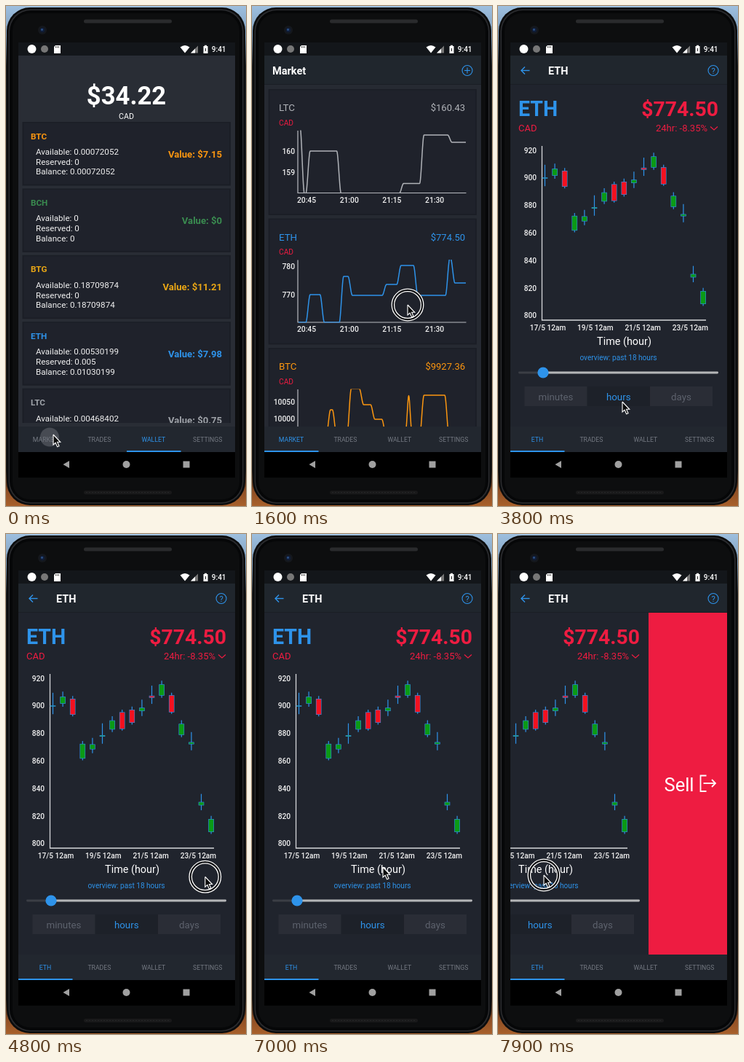
An HTML page with a canvas that plays this animation: 330x686 px, repeating every 8 s.

```html
<!DOCTYPE html>
<html lang="en">
<head>
<meta charset="utf-8">
<title>Crypto wallet demo</title>
<style>
html, body { margin: 0; width: 100%; height: 100%; overflow: hidden; background: #000; }
canvas { display: block; width: 330px; height: 686px; }
</style>
</head>
<body>
<canvas id="stage"></canvas>
<script>
const W = 330, H = 686, LOOP = 8000, TAU = Math.PI * 2;
const canvas = document.getElementById('stage');
const dpr = window.devicePixelRatio || 1;
canvas.width = W * dpr;
canvas.height = H * dpr;
const ctx = canvas.getContext('2d');

const BLUE = '#2e93ea', RED = '#ee1c41', ORANGE = '#fb9610', GREY = '#9fa3a9';
const PAGE = '#20242d', BAR = '#20262d', CARD = '#1f222b', GAP = '#262a32', LABEL = '#f1f1f1';

// ---------- helpers ----------
function text(str, x, y, size, color, align = 'left', weight = 400) {
  ctx.font = `${weight} ${size}px Roboto, sans-serif`;
  ctx.textAlign = align;
  ctx.fillStyle = color;
  ctx.fillText(str, x, y);
}

function rect(x, y, w, h, color) {
  ctx.fillStyle = color;
  ctx.fillRect(x, y, w, h);
}

function rounded(x, y, w, h, r, color) {
  ctx.beginPath();
  ctx.roundRect(x, y, w, h, r);
  ctx.fillStyle = color;
  ctx.fill();
}

function disc(x, y, r, color) {
  ctx.beginPath();
  ctx.arc(x, y, r, 0, TAU);
  ctx.fillStyle = color;
  ctx.fill();
}

function ring(x, y, r, color, width) {
  ctx.beginPath();
  ctx.arc(x, y, r, 0, TAU);
  ctx.strokeStyle = color;
  ctx.lineWidth = width;
  ctx.stroke();
}

function trace(points) {
  ctx.beginPath();
  for (let i = 0; i < points.length; i += 2) ctx.lineTo(points[i], points[i + 1]);
}

function lines(points, color, width) {
  trace(points);
  ctx.strokeStyle = color;
  ctx.lineWidth = width;
  ctx.stroke();
}

function shape(points, color) {
  trace(points);
  ctx.closePath();
  ctx.fillStyle = color;
  ctx.fill();
}

function plot(f, from, to, color, width) {
  ctx.beginPath();
  for (let x = from; x <= to; x += 0.5) ctx.lineTo(x, f(x));
  ctx.strokeStyle = color;
  ctx.lineWidth = width;
  ctx.lineJoin = 'round';
  ctx.stroke();
}

function clipped(x, y, w, h, draw) {
  ctx.save();
  ctx.beginPath();
  ctx.rect(x, y, w, h);
  ctx.clip();
  draw();
  ctx.restore();
}

const clamp = v => Math.max(0, Math.min(1, v));
const ease = v => v * v * (3 - 2 * v);
const progress = (t, from, to) => ease(clamp((t - from) / (to - from)));

// Eased interpolation between keys of the form [position, ...values].
function between(keys, at) {
  let i = 0;
  while (i < keys.length - 2 && keys[i + 1][0] <= at) i++;
  const a = keys[i], b = keys[i + 1], k = progress(at, a[0], b[0]);
  return a.slice(1).map((v, j) => v + (b[j + 1] - v) * k);
}

// ---------- phone ----------
function drawPhone() {
  const backdrop = ctx.createLinearGradient(0, 0, 0, H);
  backdrop.addColorStop(0, '#9dbfdf');
  backdrop.addColorStop(0.06, '#7f9dbb');
  backdrop.addColorStop(0.12, '#1b1d20');
  backdrop.addColorStop(0.93, '#161413');
  backdrop.addColorStop(0.97, '#8f4f25');
  backdrop.addColorStop(1, '#a8602b');
  rect(0, 0, W, H, backdrop);
  rounded(1, 2, 328, 683, 32, '#0b0c0d');
  rounded(3.5, 4.5, 323, 678, 30, '#2a2b2e');
  rounded(5, 6, 320, 675, 29, '#060708');
  rounded(9, 10, 312, 667, 24, '#0d0e0f');
  rounded(107, 18.5, 121, 5, 2.5, '#2a2b2d');
  rounded(107, 665, 121, 5, 2.5, '#19191a');
  for (let x = 110; x < 226; x += 4) rect(x, 667, 2, 1, '#262728');
  disc(50, 33, 6, '#15181d');
  disc(50, 33, 3.2, '#101d38');
  disc(49.5, 32.5, 1.4, '#2d5288');
}

function drawStatusBar() {
  rect(17, 50, 298, 18, '#13161a');
  disc(35.5, 59, 6, '#fff');
  disc(53, 59, 5, '#777');
  shape([68, 54, 75, 54, 75, 65, 66, 65, 66, 56], '#fff');
  for (const x of [68, 70, 72]) rect(x, 55.3, 1, 2, '#333');
  ctx.beginPath();
  ctx.moveTo(246, 64.5);
  ctx.lineTo(239.5, 56.5);
  ctx.quadraticCurveTo(246, 51.5, 252.5, 56.5);
  ctx.fillStyle = '#fff';
  ctx.fill();
  shape([264, 54.5, 264, 64.5, 254, 64.5], '#777');
  shape([260, 58.5, 260, 64.5, 254, 64.5], '#fff');
  rect(271.5, 55, 6, 10, '#fff');
  rect(273, 53.8, 3, 1.5, '#fff');
  rect(274, 58, 1, 4, '#222');
  text('9:41', 302.5, 63, 10, '#fff', 'right', 500);
}

function drawNavBar() {
  rect(17, 612, 298, 35, '#000');
  shape([78.5, 629, 87, 624, 87, 634], '#a0a0a0');
  disc(165.5, 629, 5, '#a0a0a0');
  rect(243.5, 624.5, 9, 9, '#a0a0a0');
}

function drawTabs(first, active) {
  rect(17, 577, 298, 35, '#22272f');
  [first, 'TRADES', 'WALLET', 'SETTINGS'].forEach((name, i) => {
    const color = Math.abs(active - i) < 0.5 ? BLUE : '#747982';
    text(name, 54 + i * 74.4, 597.5, 8.7, color, 'center');
  });
  rect(17 + active * 74.5, 610, 74.5, 2, BLUE);
}

// ---------- wallet ----------
const coins = [
  ['BTC', '0.00072052', '0', '0.00072052', '$7.15', ORANGE],
  ['BCH', '0', '0', '0', '$0', '#3a8c50'],
  ['BTG', '0.18709874', '0', '0.18709874', '$11.21', '#e9a615'],
  ['ETH', '0.00530199', '0.005', '0.01030199', '$7.98', BLUE],
  ['LTC', '0.00468402', '0', '0.00468402', '$0.75', GREY]
];

function card(y, h) {
  rect(22.5, y, 286.5, h, '#1b1e26');
  rect(24.5, y + 1.5, 282.5, h - 3.5, CARD);
}

function drawWallet() {
  rect(17, 68, 298, 509, '#292d35');
  text('$34.22', 165.5, 135, 34.6, '#fff', 'center', 700);
  text('CAD', 165.5, 155, 10.7, '#fff', 'center');
  clipped(17, 158, 298, 414, () => {
    coins.forEach(([name, available, reserved, balance, value, color], i) => {
      const y = 159 + i * 91.4;
      card(y, 87.5);
      text(name, 34, y + 23.5, 11.7, color, 'left', 700);
      [`Available: ${available}`, `Reserved: ${reserved}`, `Balance: ${balance}`].forEach((row, k) =>
        text(row, 41, y + 45 + k * 13.7, 11.6, LABEL));
      text('Value: ' + value, 297, y + 48.5, 13.1, color, 'right', 700);
    });
  });
}

// ---------- market ----------
// Each graph starts at a level and steps to a new one at each [x, level].
const markets = [
  { name: 'LTC', price: '$160.43', color: '#b0b3b8', ticks: [['160', 32], ['159', 60.5]],
    start: 165, steps: [[69, 257], [77, 199], [119.5, 257], [205.5, 243.5], [233.5, 177], [272, 187]] },
  { name: 'ETH', price: '$774.50', color: BLUE, ticks: [['780', 12.5], ['770', 51.5]],
    start: 434, steps: [[77, 396], [96.5, 434], [123, 371], [135, 397], [182, 382], [202, 356],
      [225, 397], [269, 346], [276, 380]] },
  { name: 'BTC', price: '$9927.36', color: ORANGE, ticks: [['10050', 21], ['10000', 43.5]],
    start: 590, steps: [[105, 554], [113.5, 590], [133.5, 525], [150.5, 547], [166, 567],
      [181.5, 590], [213.5, 525], [217.5, 590], [233.5, 534], [268, 590]] }
];

function stepGraph({ start, steps }) {
  return x => steps.reduce((y, [at, level], i) => {
    const previous = i ? steps[i - 1][1] : start;
    return y + (level - previous) * progress(x, at - 3, at + 3);
  }, start);
}

function drawHeader(title, x) {
  rect(17, 68, 298, 40, BAR);
  rect(17, 107, 298, 1, '#1a1e24');
  text(title, x, 94, 14.5, '#fff', 'left', 700);
  ring(296, 88.5, 7, BLUE, 1.1);
}

function drawMarket(dim) {
  rect(17, 68, 298, 509, GAP);
  drawHeader('Market', 28);
  lines([292, 88.5, 300, 88.5], BLUE, 1.1);
  lines([296, 84.5, 296, 92.5], BLUE, 1.1);
  clipped(17, 108, 298, 469, () => {
    markets.forEach((m, i) => {
      const y = 114 + i * 177.5, top = y + 57;
      card(y, 173);
      ctx.save();
      if (m.name === 'ETH') ctx.globalAlpha *= dim;
      text(m.name, 37, y + 30, 13.3, m.color);
      text(m.price, 293, y + 30, 13, m.color, 'right');
      text('CAD', 37, y + 49.5, 10.2, RED);
      m.ticks.forEach(([label, dy]) => text(label, 59, top + dy, 10.3, LABEL, 'right', 500));
      ['20:45', '21:00', '21:15', '21:30'].forEach((label, k) =>
        text(label, 75 + k * 58.7, y + 155.5, 10.3, LABEL, 'center', 500));
      lines([63, top, 63, y + 142.5, 294.5, y + 142.5], '#b9bcc1', 1.2);
      clipped(63, top - 0.5, 232, 86.5, () => plot(stepGraph(m), 64, 294, m.color, 1.5));
      ctx.restore();
    });
  });
}

// ---------- coin details ----------
const dayTrend = [[64, 228], [92, 232], [101, 290], [110, 290], [119, 260], [152, 256],
  [165, 313], [176, 313], [186, 293], [209, 291], [223, 315], [238, 397], [251, 405], [283, 370]];

// A price trend with a ripple that swells and fades.
function dayPrice(x) {
  const swell = 9 * (1 + Math.cos(TAU * (x - 75) / 62));
  return between(dayTrend, x)[0] - swell * Math.cos(TAU * (x - 68.5) / 11.4);
}

const hourTrend = [[0, 236], [1, 228], [2, 237], [3, 298], [4, 292], [6, 262], [8, 250],
  [11, 214], [14, 287], [15, 370], [16, 400]];
const falling = [2, 7, 8, 10, 12];

// Short bodies get long wicks.
function drawCandles() {
  for (let i = 0; i < 17; i++) {
    const x = 64.5 + i * 13.6;
    const [middle] = between(hourTrend, i);
    const body = 12.5 - 11 * Math.cos(TAU * i / 4.8);
    const wick = 24 / (1 + body / 4);
    const top = middle - body / 2;
    lines([x, top - wick, x, top + body + wick * 0.6], BLUE, 1.2);
    rect(x - 3.8, top, 7.6, body, BLUE);
    rect(x - 3.2, top + 0.6, 6.4, body - 1.2, falling.includes(i) ? '#f3111f' : '#0b9a16');
  }
}

const views = {
  minutes: {
    draw: () => plot(dayPrice, 64, 283, BLUE, 1.7), thumb: 160, title: 'Time (min)',
    note: 'overview: past 24 hours in 60 minutes segments',
    highest: 840, rows: 5, y0: 234, dy: 42.2,
    xAxis: ['0:00', '6:00', '12:00', '18:00'], x0: 86, dx: 55
  },
  hours: {
    draw: drawCandles, thumb: 62, title: 'Time (hour)', note: 'overview: past 18 hours',
    highest: 920, rows: 7, y0: 201.5, dy: 37.8,
    xAxis: ['17/5 12am', '19/5 12am', '21/5 12am', '23/5 12am'], x0: 68.5, dx: 65.3
  }
};

function drawDetails(mode, shift) {
  const view = views[mode];
  rect(17, 68, 298, 509, PAGE);
  drawHeader('ETH', 69);
  text('?', 296, 92.5, 11, BLUE, 'center');
  lines([43.5, 88.5, 32, 88.5], BLUE, 1.4);
  lines([37, 83.5, 32, 88.5, 37, 93.5], BLUE, 1.4);

  clipped(17, 108, 298, 469, () => {
    ctx.translate(-shift, 0);
    text('ETH', 28, 150.5, 28.6, BLUE, 'left', 700);
    text('$774.50', 303, 150.5, 28.3, RED, 'right', 700);
    text('CAD', 28, 172, 13, RED);
    text('24hr: -8.35%', 288, 172, 13, RED, 'right');
    lines([292, 165.5, 297, 170, 302, 165.5], RED, 1.2);

    for (let i = 0; i < view.rows; i++)
      text(view.highest - i * 20, 53, view.y0 + i * view.dy, 10.2, LABEL, 'right', 500);
    view.xAxis.forEach((label, i) =>
      text(label, view.x0 + i * view.dx, 444.5, 10.1, LABEL, 'center', 500));
    lines([60.5, 192, 60.5, 431, 286, 431], '#d5d7da', 1.3);
    view.draw();
    text(view.title, 173.5, 465, 14.4, '#fff', 'center');
    text(view.note, 165.5, 485.5, 10.1, BLUE, 'center');

    rounded(28, 501.6, 275, 2.8, 1.4, '#3b3e45');
    rounded(view.thumb, 501.6, 303 - view.thumb, 2.8, 1.4, '#b4b5b7');
    disc(view.thumb, 503, 7.6, BLUE);

    ['minutes', 'hours', 'days'].forEach((name, i) => {
      const on = name === mode;
      rect(36.5 + i * 86.2, 522, 86.2, 27, on ? '#1d2129' : '#2a2d36');
      text(name, 79.5 + i * 86.2, 541, 13.3, on ? BLUE : '#5d626d', 'center');
    });

    if (shift > 0) drawSellPanel();
  });
}

function drawSellPanel() {
  rect(315, 108, 298, 469, RED);
  text('Sell', 336.5, 352.5, 25.5, '#fff');
  lines([394.5, 331.5, 386.5, 331.5, 386.5, 353, 394.5, 353], '#fff', 1.8);
  lines([390.5, 342, 407, 342], '#fff', 1.8);
  lines([402, 337, 407, 342, 402, 347], '#fff', 1.8);
}

// ---------- pointer ----------
const WAVE_START = 4700, WAVE_END = 7000, DRAG_START = 7400;
const wavePhase = t => TAU * (t - WAVE_START) / 841;
const waving = t => t >= WAVE_START && t < WAVE_END;

const route = [
  [0, 65, 588], [950, 65, 588], [1400, 214, 410], [1800, 214, 410], [2400, 211, 408],
  [2850, 211, 408], [3200, 171, 543], [3850, 171, 543], [WAVE_START, 305, 466],
  [WAVE_END, 180, 457], [DRAG_START, 246, 468], [7900, 63, 468]
];

// Between taps the hand sweeps to and fro, pressing on every leftward stroke.
function pointerAt(t) {
  if (!waving(t)) return between(route, t);
  const c = Math.cos(wavePhase(t)), s = Math.sin(wavePhase(t));
  return [190 + 115 * c, 464 + 2 * c + 7 * s];
}

function isPressed(t) {
  const tapping = [1550, 3220].some(start => t >= start && t < start + 125);
  return tapping || t >= DRAG_START || (waving(t) && Math.sin(wavePhase(t)) > 0);
}

function drawPointer(t, x, y) {
  if (isPressed(t)) {
    ring(x, y, 20, '#0b0c0f', 5);
    ring(x, y, 21.8, '#fff', 1.3);
    ring(x, y, 18.4, '#fff', 1.3);
  }
  const arrow = [0, 0, 0, 14, 3.1, 11.2, 5.6, 16.8, 8, 15.8, 5.6, 10.3, 9.8, 10.3];
  ctx.save();
  ctx.translate(x, y);
  shape(arrow, '#0a0a0a');
  lines([...arrow, 0, 0], '#fff', 1.1);
  ctx.restore();
}

// ---------- scene ----------
function drawTabSlide(t) {
  const active = 2 * (1 - progress(t, 120, 480));
  rect(17, 68, 298, 509, GAP);
  [[0, () => drawMarket(1)], [2, drawWallet]].forEach(([index, draw]) => {
    ctx.save();
    ctx.translate((index - active) * 298, 0);
    draw();
    ctx.restore();
  });
  drawTabs('MARKET', active);
  ctx.globalAlpha = 0.5 * (1 - clamp((t - 40) / 300));
  disc(60, 591.5, 13, '#6c7078');
  ctx.globalAlpha = 1;
}

function drawApp(t, pointerX) {
  if (t < 600) return drawTabSlide(t);
  const enter = progress(t, 1950, 2250);
  if (enter < 1) {
    drawMarket(t >= 1675 ? 0.6 : 1);
    drawTabs('MARKET', 0);
  }
  if (enter > 0) {
    const shift = t >= DRAG_START ? Math.max(0, 171 - pointerX) : 0;
    ctx.save();
    ctx.globalAlpha = enter;
    ctx.translate(0, 40 * (1 - enter));
    drawDetails(t < 3400 ? 'minutes' : 'hours', shift);
    ctx.restore();
    drawTabs(enter > 0.5 ? 'ETH' : 'MARKET', 0);
  }
}

function frame(now) {
  const t = now % LOOP;
  const [x, y] = pointerAt(t);
  ctx.setTransform(dpr, 0, 0, dpr, 0, 0);
  drawPhone();
  clipped(17, 50, 298, 597, () => {
    drawApp(t, x);
    drawStatusBar();
    drawNavBar();
  });
  drawPointer(t, x, y);
  requestAnimationFrame(frame);
}
requestAnimationFrame(frame);
</script>
</body>
</html>
```
